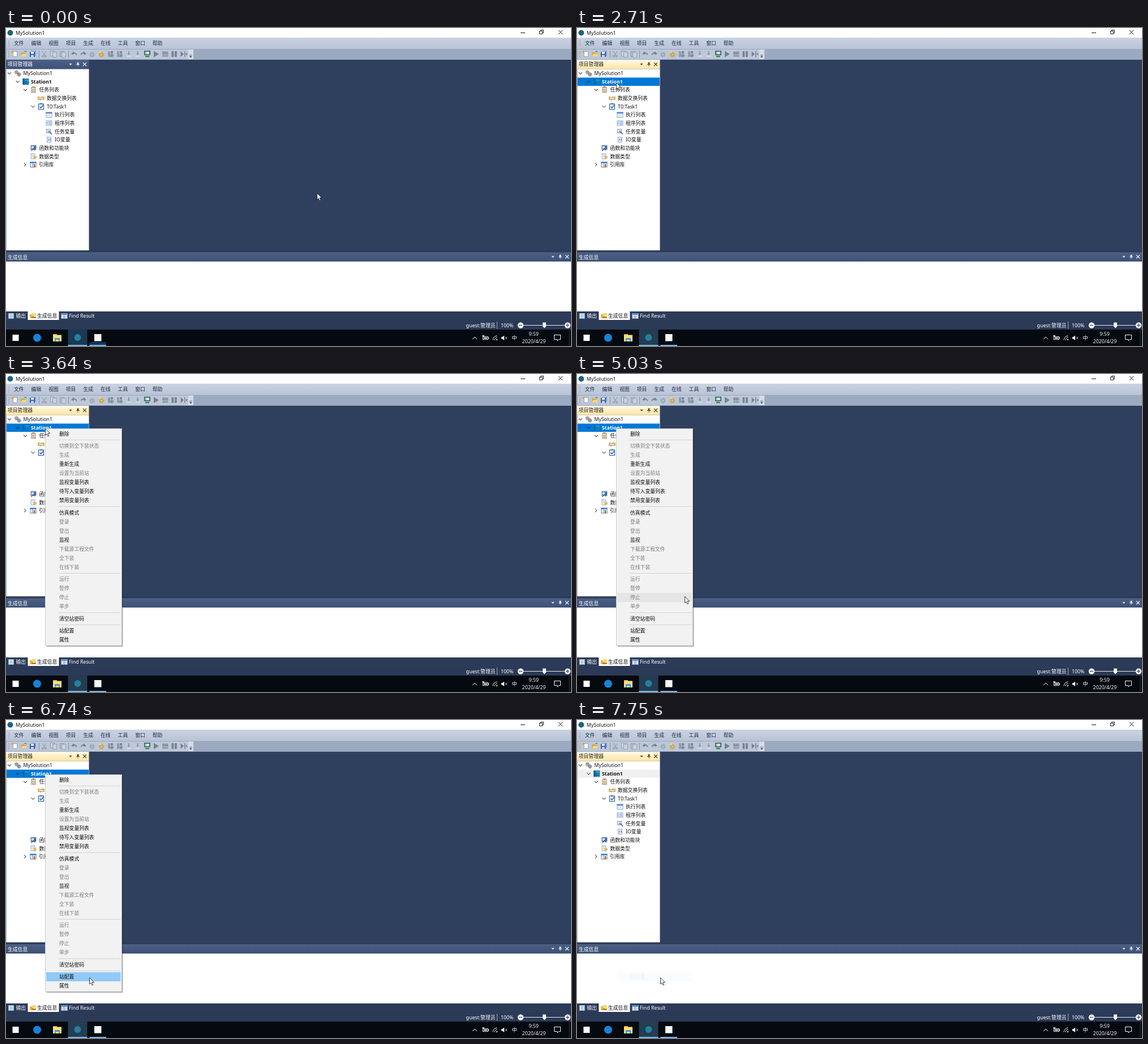
An HTML page with a canvas that plays this animation: 998 by 561 pixels, repeating every 8 s.

```html
<!DOCTYPE html>
<html lang="zh-CN">
<head>
<meta charset="utf-8">
<title>MySolution1</title>
<style>
html, body { margin: 0; width: 100%; height: 100%; overflow: hidden; background: #2f405f; }
canvas { display: block; width: 998px; height: 561px; }
</style>
</head>
<body>
<canvas id="stage"></canvas>
<script>
const W = 998, H = 561, LOOP = 8000;
const canvas = document.getElementById('stage');
const dpr = window.devicePixelRatio || 1;
canvas.width = W * dpr;
canvas.height = H * dpr;
const g = canvas.getContext('2d');
g.scale(dpr, dpr);

const FONT = '"Noto Sans", "Noto Sans CJK SC", "Noto Sans CJK", sans-serif';
const NAVY = '#2f405f';

// ---- drawing helpers ----
function rect(x, y, w, h, c) { g.fillStyle = c; g.fillRect(x, y, w, h); }
function box(x, y, w, h, c, lw = 1) { g.strokeStyle = c; g.lineWidth = lw; g.strokeRect(x, y, w, h); }
function disc(x, y, r, c) { g.fillStyle = c; g.beginPath(); g.arc(x, y, r, 0, 7); g.fill(); }
function arc(x, y, r, a, b, c, lw = 1) {
  g.strokeStyle = c; g.lineWidth = lw; g.beginPath(); g.arc(x, y, r, a, b); g.stroke();
}
function trace(p, x, y) {
  g.beginPath();
  for (let i = 0; i < p.length; i += 2) g.lineTo(x + p[i], y + p[i + 1]);
}
function line(p, c, lw = 1, x = 0, y = 0) { trace(p, x, y); g.strokeStyle = c; g.lineWidth = lw; g.stroke(); }
function poly(p, c, x = 0, y = 0) { trace(p, x, y); g.closePath(); g.fillStyle = c; g.fill(); }
function text(s, x, y, c, o = {}) {
  g.font = `${o.bold ? 'bold ' : ''}${o.size || 8.8}px ${FONT}`;
  g.textAlign = o.align || 'left';
  g.fillStyle = c;
  g.fillText(s, x, y + 3.2);
}
function fade(y, h, a, b) {
  const f = g.createLinearGradient(0, y, 0, y + h);
  f.addColorStop(0, a); f.addColorStop(1, b);
  return f;
}
function cross(x, y, r, c, lw = 1) {
  line([-r, -r, r, r], c, lw, x, y);
  line([r, -r, -r, r], c, lw, x, y);
}

// ---- icons, each centred on x, y ----
function page(x, y, edge = '#8291a8', fill = '#fff') {
  rect(x - 4, y - 5, 8, 10, fill); box(x - 3.5, y - 4.5, 7, 9, edge, .8);
}
function folder(x, y, s = 1) {
  poly([-6 * s, -4 * s, -1 * s, -4 * s, 0, -3 * s, 4 * s, -3 * s, 4 * s, 4 * s, -6 * s, 4 * s], '#d9a83c', x, y);
  poly([-3 * s, -1 * s, 6 * s, -1 * s, 4 * s, 4 * s, -6 * s, 4 * s], '#ffd872', x, y);
}
function gear(x, y, c, r = 3) {
  g.setLineDash([1.6, 1]); arc(x, y, r + 1, 0, 7, c, 1.6); g.setLineDash([]);
  arc(x, y, r - .6, 0, 7, c, 1.5);
}
function grid(x, y, head) {
  rect(x - 5.5, y - 5, 11, 10, '#fff');
  rect(x - 5.5, y - 5, 11, 3, head);
  box(x - 5, y - 4.5, 10, 9, '#7597c4', .9);
  for (const d of [-2, 1]) line([d, -2, d, 4], '#b5c9e3', .7, x, y);
  line([-5, 1, 5, 1], '#b5c9e3', .7, x, y);
}
function bars(x, y, c) {
  for (const d of [-2, 0, 2]) line([-2.5, d, 2.5, d], c, .8, x, y);
}
function pin(x, y, c) {
  rect(x - 1.5, y - 3, 3, 4, c); line([-3, 1, 3, 1], c, 1, x, y); line([0, 1, 0, 4], c, 1, x, y);
}
function panelButtons(xs, y, c) {
  poly([-2.7, -1.2, 2.7, -1.2, 0, 1.8], c, xs[0], y);
  pin(xs[1], y - .5, c);
  cross(xs[2], y, 3, c, 1.2);
}
function chevron(x, y, open, c) {
  line(open ? [-3, -1.5, 0, 1.5, 3, -1.5] : [-1.5, -3, 1.5, 0, -1.5, 3], c, 1.1, x, y);
}

const treeIcons = {
  solution(x, y) { gear(x - 2, y - 2, '#858585', 2); gear(x + 2.5, y + 2, '#777', 2); },
  station(x, y) {
    rect(x - 5.5, y - 5.5, 11, 11, '#137fb5');
    rect(x - 5.5, y - 5.5, 3, 11, '#0b5b8d');
    line([-2, -2.5, 5, -2.5], '#6fc4e6', 1, x, y);
    line([-.5, 5, -.5, -2], '#0b5b8d', .8, x, y);
  },
  tasks(x, y) { page(x, y, '#8d5f2d', '#fdf7ea'); bars(x, y + .5, '#79726a'); rect(x - 2, y - 6, 4, 2, '#947348'); },
  swap(x, y) {
    rect(x - 6, y - 3, 4, 6, '#e7b437'); rect(x + 2, y - 3, 4, 6, '#e7b437');
    rect(x - 3, y - 1.5, 6, 3, '#fff');
    line([-2, -1, 2, -1, 1, -3], '#4f79bd', 1, x, y); line([2, 2, -2, 2, -1, 4], '#4f79bd', 1, x, y);
  },
  task(x, y) {
    rect(x - 5, y - 5, 10, 10, '#fff'); box(x - 4.5, y - 4.5, 9, 9.5, '#2e62a8', 1.2);
    rect(x - 2, y - 6, 4, 2.5, '#6a788c');
    line([-2.5, 0, -.5, 2.5, 4.5, -3], '#2369bd', 1.7, x, y);
  },
  run(x, y) { grid(x, y, '#5f8fce'); },
  prog(x, y) {
    rect(x - 5.5, y - 4.5, 11, 9, '#e9f1fb'); box(x - 5, y - 4, 10, 8, '#87a3c8', .9);
    bars(x + 1.5, y, '#6f9ad0'); rect(x - 4, y - 2, 2, 4, '#a9c1e2');
  },
  vars(x, y) {
    rect(x - 5, y - 4, 8, 7, '#dce7f4'); box(x - 4.5, y - 4, 7, 6.5, '#7d97b9', .9);
    disc(x, y + 1, 2.4, '#7fb0e0'); line([1, 1, 5, 5], '#7b6a53', 1.6, x, y);
  },
  io(x, y) { page(x, y, '#7d97b9', '#eaf1fa'); line([-2, -2, 0, 0, -2, 2], '#3e68a8', 1, x, y); line([1, -2, 3, 0, 1, 2], '#3e68a8', 1, x, y); },
  func(x, y) {
    rect(x - 5, y - 5, 10, 8, '#5c83be'); rect(x - 3.5, y - 3, 4, 4, '#dfe9f6');
    line([-4, 5, 0, 1, 3, 4], '#46536a', 1.3, x, y); rect(x + 2, y - 3, 2, 5, '#3b5d92');
  },
  type(x, y) { page(x - 1, y, '#8ba1bd', '#f5f9fd'); bars(x - 1, y - 1, '#b4c6dc'); gear(x + 2.5, y + 2, '#d9ae3e', 1.5); },
  lib(x, y) {
    rect(x - 5.5, y - 5, 11, 10, '#eaf3fc'); rect(x - 5.5, y - 5, 11, 2.5, '#3e80c5');
    box(x - 5, y - 4.5, 10, 9, '#3e80c5', .9); line([-1, -3, -1, 4], '#3e80c5', .9, x, y);
    rect(x + 1, y - 1, 2, 6, '#d04a35'); rect(x + 3.5, y + 1, 2, 4, '#e8a531');
  }
};

// [indent x, icon, label, arrow: 1 open / 2 closed]
const tree = [
  [20.5, 'solution', 'MySolution1', 1], [35, 'station', 'Station1', 1],
  [48.5, 'tasks', '任务列表', 1], [62, 'swap', '数据交换列表', 0],
  [62, 'task', 'T0:Task1', 1], [76, 'run', '执行列表', 0],
  [76, 'prog', '程序列表', 0], [76, 'vars', '任务变量', 0],
  [76, 'io', 'IO变量', 0], [48.5, 'func', '函数和功能块', 0],
  [48.5, 'type', '数据类型', 0], [48, 'lib', '引用库', 2]
];

// leading '-' marks a disabled item, '' a separator
const menu = ['删除', '', '-切换到全下装状态', '-生成', '重新生成', '-设置为当前站', '监视变量列表',
  '待写入变量列表', '禁用变量列表', '', '仿真模式', '-登录', '-登出', '监视', '-下载源工程文件',
  '-全下装', '-在线下装', '', '-运行', '-暂停', '-停止', '-单步', '', '清空站密码', '', '站配置', '属性'];
const ITEM = 16.05, GAP = 5.3;
let rowY = 97.4;
const rows = menu.map(s => {
  const r = { y: rowY, off: s[0] === '-', label: s.replace('-', '') };
  rowY += s ? ITEM : GAP;
  return r;
});

// ---- pointer motion: start, last step, step count, path ----
const moves = [
  [680, 1470, 11, [549, 291, 525, 285, 470, 268, 405, 249, 378, 242, 385, 247, 403.5, 256]],
  [1540, 2310, 11, [403.5, 256, 380, 245, 300, 206, 180, 150, 95, 108, 74, 99, 69, 96]],
  [4570, 5340, 11, [69, 96, 85, 125, 125, 215, 165, 320, 196, 408, 208, 440, 213, 452]],
  [5420, 5970, 8, [213, 452, 206, 461, 188, 462, 165, 453, 150, 448, 147, 446]],
  [6580, 6740, 3, [147, 446, 147, 454]]
];
function stepOf(t, a, b, n) {
  return Math.max(0, Math.min(n, 1 + Math.floor((t - a) / (b - a) * (n - 1) + .05)));
}
function pointer(t) {
  let m = moves[0];
  for (const s of moves) if (t >= s[0]) m = s;
  const [a, b, n, p] = m, last = p.length / 2 - 1;
  const u = stepOf(t, a, b, n) / n * last;
  const i = Math.min(last - 1, Math.floor(u)), f = u - i;
  const mix = k => p[2 * i + k] + (p[2 * i + 2 + k] - p[2 * i + k]) * f;
  return [Math.round(mix(0)), Math.round(mix(1))];
}

// ---- window parts ----
function titleBar() {
  rect(0, 0, W, 17, '#fff');
  disc(7.5, 8.5, 5, '#1d6380');
  text('MySolution1', 17, 8.5, '#111');
  line([909, 8.5, 917, 8.5], '#111');
  box(942.5, 5.5, 5, 5, '#111', .9);
  line([944.5, 5, 944.5, 3.5, 949.5, 3.5, 949.5, 8.5, 948, 8.5], '#111', .9);
  cross(979.5, 7.5, 3.7, '#111', 1);
}
function grip(y, n) { for (let i = 0; i < n; i++) rect(4.5, y + i * 3, 1.2, 1.2, '#7484a0'); }

function menuBar() {
  rect(0, 17, W, 20, fade(17, 20, '#cbd3e2', '#b8c3d6'));
  grip(22, 4);
  '文件 编辑 视图 项目 生成 在线 工具 窗口 帮助'.split(' ')
    .forEach((s, i) => text(s, 14 + 30.6 * i, 27, '#1b293e'));
}
function toolBar() {
  const y = 46, dim = '#8a94a5', dark = '#77818f';
  rect(0, 37, W, 19, '#9caac1');
  rect(1, 38, 330, 17, '#bcc7d8');
  rect(322, 38, 9, 17, '#d3dbe7');
  grip(41, 4);
  page(16, y); line([9, 42, 14, 42], '#e8a822', 1.5); line([11.5, 39.5, 11.5, 44.5], '#e8a822', 1.5);
  folder(31.5, y + .5, .85); line([32, 42, 35, 40.5, 36, 43], '#3f7f46');
  rect(44, 40, 9, 9, '#8aa6dc'); rect(42, 42, 9, 9, '#3a5ca8');
  rect(44, 42, 5, 3.5, '#fff'); rect(44, 47.5, 5, 3.5, '#c5d2ec');
  for (const x of [58.5, 110.5]) line([x, 40, x, 53], '#8794aa');
  line([64, 41, 69, 49], dim); line([71, 41, 66, 49], dim);
  arc(65, 50, 1.5, 0, 7, dim); arc(70, 50, 1.5, 0, 7, dim);
  page(82, y - 1, dim, '#c9d1de'); page(86, y + 1, dim, '#c9d1de');
  page(99, y, dim, '#b3bdcc'); page(102, y + 1.5, dim, '#c9d1de');
  arc(120.5, 48, 4, -2.6, -.1, dark, 1.8); poly([115, 46, 119.5, 41, 120.5, 47], dark);
  arc(136.5, 48, 4, -3, -.5, dark, 1.8); poly([142, 46, 137.5, 41, 136.5, 47], dark);
  gear(152, y + 1, '#9aa4b3'); gear(168.5, y + 1, '#d7a02a');
  rect(165, 41, 3, 3, '#f6d467');
  for (const x of [185, 201]) {
    rect(x - 5, 41, 4, 10, '#929cac'); rect(x, 41, 4, 3.5, dark);
    gear(x + 2, 48.5, dark, 1.6);
  }
  for (const x of [217, 232.5]) {
    rect(x - 1, 41, 2, 4, '#8d98aa'); poly([-3, 0, 3, 0, 0, 3], '#8d98aa', x, 45);
    rect(x - 4, 49, 8, 1.5, '#dce2eb');
  }
  rect(244, 40, 11, 8, '#3f5b72'); rect(245.5, 41.5, 8, 5, '#8fd0a0');
  disc(250, 44, 2, '#eaf6e6'); rect(246, 49, 7, 2.5, '#3e8b51');
  poly([261, 40.5, 270, 46, 261, 51.5], dark);
  rect(276, 41.5, 10.5, 9, '#8b95a4'); rect(276, 47, 10.5, 1, '#bcc7d8');
  rect(292.5, 41, 3.7, 10, dark); rect(298, 41, 3.7, 10, dark);
  poly([308.5, 41, 314, 46, 308.5, 51], dark); rect(315, 41, 1.5, 10, dark);
  poly([-3, 0, 0, -2.5, 0, 2.5], dark, 320, 46);
  line([324, 48, 328.5, 48], '#222', .8); poly([324, 50, 328.5, 50, 326.2, 52.3], '#222');
}

function projectPanel(t) {
  const active = t >= 2710;
  const ink = active ? '#222' : '#fff';
  rect(0, 56, 146.5, 16.5, active ? fade(56, 16, '#fffaea', '#ffe5a0') : fade(56, 16, '#4d6185', '#3d5277'));
  text('项目管理器', 3, 64.2, ink);
  panelButtons([114, 127, 139], 64, active ? '#5d4a1e' : '#e4e9f2');
  rect(0, 72.5, 146.5, 320, '#fff');
  line([.4, 73, .4, 392], '#8290a8', .8);
  const blue = t >= 2710 && t < 7500, gray = t >= 2460 && !blue;
  if (blue || gray) rect(1, 87.5, 145, 14.6, blue ? '#0078d7' : '#f0f0f0');
  tree.forEach(([x, icon, label, arrow], i) => {
    const y = 80 + 14.63 * i, station = i === 1;
    if (arrow) chevron(x - 14.5, y, arrow === 1, station && blue ? '#16395c' : '#555');
    treeIcons[icon](x, y);
    if (station && blue) { g.globalAlpha = .4; rect(x - 6, y - 6, 12, 12, '#0078d7'); g.globalAlpha = 1; }
    text(label, x + (station ? 9 : 10), y, station && blue ? '#fff' : '#111', { bold: station });
  });
}

function bottomPanel() {
  rect(0, 392.5, W, 3, '#2a3956');
  rect(0, 395.5, W, 16.5, fade(395, 16, '#4d6185', '#3d5277'));
  text('生成信息', 3, 404.3, '#fff');
  panelButtons([966, 979, 991], 403.5, '#e4e9f2');
  rect(0, 412, W, 88, '#fff');
  rect(0, 500, W, 16, '#2c3b58');
  rect(38.5, 500, 55, 15, '#fff');
  page(9, 508, '#6c93c5'); rect(4, 503, 10, 10, '#dfeaf6'); box(4.5, 503.5, 9, 9, '#7fa4cd'); bars(9, 508, '#64a38d');
  rect(42, 505, 7, 7, '#e7b83d'); rect(46, 503, 7, 5, '#f6d777'); rect(45, 509, 8, 3, '#b98928');
  grid(103, 508, '#4f8bcb'); bars(103, 509, '#6785a8');
  text('输出', 17.5, 508, '#fff');
  text('生成信息', 55, 508, '#111');
  text('Find Result', 111, 507.5, '#fff');
}

function statusBar() {
  rect(0, 515.5, W, 17, '#2b3a57');
  text('guest:管理员', 864.5, 524.5, '#fff', { align: 'right' });
  line([867.5, 518, 867.5, 531], '#aab4c6', .9);
  text('100%', 874, 524.5, '#fff');
  line([914, 524.5, 987, 524.5], '#e9edf3', 1);
  for (const x of [909, 992]) { disc(x, 524.5, 5.2, '#f2f4f7'); line([x - 3, 524.5, x + 3, 524.5], '#38455c', 1.2); }
  line([992, 521.5, 992, 527.5], '#38455c', 1.2);
  poly([948, 519.5, 954, 519.5, 954, 526.5, 951, 529.5, 948, 526.5], '#f2f4f7');
}

function taskBar(t) {
  rect(0, 532, W, 29, '#050a10');
  const first = t < 70;
  rect(109.5, 532, 34, 29, first ? '#1c3853' : '#253c51');
  if (first) rect(147.5, 554, 29.5, 7, '#143452');
  rect(109.5, 559, 34, 2, '#76b9ed');
  rect(147.5, 559, 29.5, 2, '#76b9ed');
  rect(11.5, 541, 11, 11, '#fff');
  disc(55, 546.5, 7, '#1683d8');
  rect(83, 540, 7, 3, '#e5b442'); rect(83, 541.5, 15, 11.5, '#ffdc7e');
  rect(86, 547, 9, 6, '#3d9cdc'); rect(88, 550, 5, 3, '#ffdc7e');
  disc(126.5, 546, 6, '#237fa0');
  rect(156, 540, 12.5, 12.5, '#f5f7f8');

  const c = '#f4f4f4';
  line([824, 549, 828, 545, 832, 549], c, 1);
  box(842.5, 544.5, 9, 5, c); rect(844, 546, 6, 2, c); rect(852, 546, 1, 2, c);
  line([841, 543, 845, 543], c, 1.5);
  for (const r of [2, 5, 8]) arc(868, 551, r, 3.2, 4.65, c, 1);
  disc(867, 550, 1, c);
  poly([875, 545, 877, 545, 880, 542.5, 880, 551, 877, 548.5, 875, 548.5], c);
  cross(883.5, 546.8, 1.8, c, .9);
  text('中', 898, 546.5, c, { size: 9.5, align: 'center' });
  text('9:59', 932, 539.5, c, { align: 'center' });
  text('2020/4/29', 932.5, 553, c, { align: 'center' });
  line([968.5, 541.5, 979.5, 541.5, 979.5, 549.5, 976.5, 549.5, 974, 552, 974, 549.5, 968.5, 549.5, 968.5, 541], c, 1);
  line([995, 532, 995, 561], '#3b4148', .8);
}

function menuRow(r, hot) {
  if (hot) rect(71, r.y, 131.5, ITEM, r.off ? '#e5e5e5' : '#91c9f7');
  text(r.label, 94, r.y + 8, r.off ? '#7d7d7d' : '#0c0c0c');
}
function contextMenu(t, px, py) {
  if (t < 3470) return;
  if (t >= 7500) {
    // only the chosen item lingers
    g.globalAlpha = [.8, .5, .25, .05][stepOf(t, 7500, 7750, 4) - 1];
    menuRow(rows[rows.length - 2], true);
  } else {
    g.globalAlpha = [.3, .7, 1][stepOf(t, 3470, 3640, 3) - 1];
    rect(72, 99, 134.5, 382.3, 'rgba(0,0,0,.22)');
    rect(71, 98, 134.5, 382.2, 'rgba(0,0,0,.35)');
    rect(69, 96, 135.7, 383.3, '#f2f2f2');
    box(69.4, 96.4, 135, 382.7, '#c2c2c2', .8);
    for (const r of rows) {
      if (!r.label) line([92, r.y + 2.8, 202.5, r.y + 2.8], '#cfcfcf', .9);
      else menuRow(r, px >= 71 && px < 203 && py >= r.y && py < r.y + ITEM);
    }
  }
  g.globalAlpha = 1;
}

function arrow(x, y) {
  const p = [.5, .5, .5, 12, 3, 9.6, 5, 13.8, 6.9, 13, 5, 8.8, 8.6, 8.8, .5, .5];
  poly(p, '#fff', x, y);
  line(p, '#111', .8, x, y);
}

function draw(t) {
  const [px, py] = pointer(t);
  rect(0, 0, W, H, NAVY);
  titleBar();
  menuBar();
  toolBar();
  projectPanel(t);
  bottomPanel();
  statusBar();
  taskBar(t);
  contextMenu(t, px, py);
  arrow(px, py);
}

const start = performance.now();
function tick() {
  draw((performance.now() - start) % LOOP);
  requestAnimationFrame(tick);
}
tick();
</script>
</body>
</html>
```
